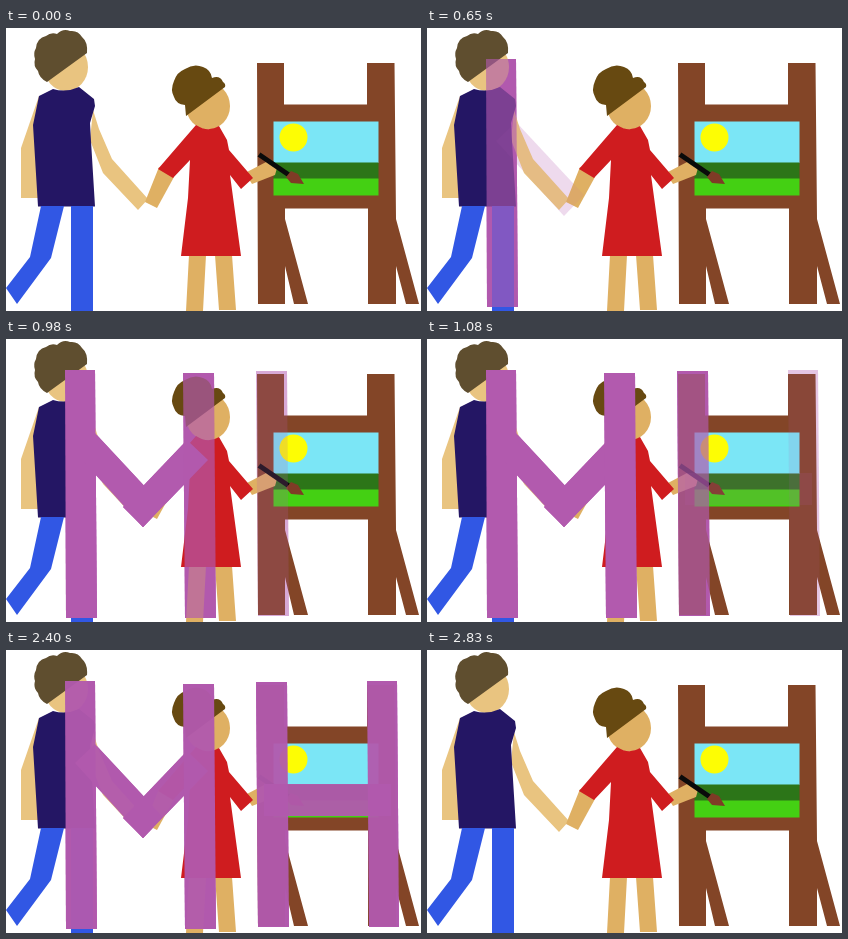
Write an HTML page that moves like this. It is 415 by 283 pixels and loops after 3 s.

```html
<!DOCTYPE html>
<html lang="en">
<head>
<meta charset="utf-8">
<title>Letters over a family scene</title>
<style>
html, body { margin: 0; height: 100%; overflow: hidden; background: #fff; }
svg { display: block; width: 100vw; height: 100vh; }
</style>
</head>
<body>
<svg viewBox="0 0 415 283">
  <g id="under" fill="#b25aae"></g>

  <g id="man">
    <g fill="#e9c480">
      <path d="M33 68L15 120V170H33Z"/>
      <path d="M87 82L93 101 106 131 142 171 132 182 97 145 84 112Z"/>
      <ellipse cx="60" cy="39" rx="22" ry="24"/>
    </g>
    <path fill="#5f4e2f" d="M41 54Q33 50 32 43Q27 38 29 31Q27 25 30 20Q31 10 40 8Q45 4 51 6Q57 0 64 3Q72 2 76 9Q82 14 81 25Z"/>
    <path fill="#241664" d="M33 68L47 61Q60 65 73 59L88 71 89 78 84 95 85 113 89 178.500H32L27 97Z"/>
    <path fill="#3157e4" d="M35 178H58L45 230 11 276 0 260 24 229ZM65 178H87V283H65Z"/>
  </g>

  <g id="easel">
    <path fill="#834527" d="M251 35H278V76.500H361V35H388.500L390 191 413 276H400L390 238V276H362V180.500H279V191L302 276H288L279 238V276H252Z"/>
    <path fill="#7be6f6" d="M267.500 93.500H372.500V135H267.500Z"/>
    <path fill="#2c7518" d="M267.500 134.500H372.500V151H267.500Z"/>
    <path fill="#44d013" d="M267.500 150.500H372.500V167.500H267.500Z"/>
    <circle fill="#fdfd04" cx="287.500" cy="109.500" r="14"/>
  </g>

  <g id="woman">
    <g fill="#dfb063">
      <path d="M153 139L168 149 151 180 139 174Z"/>
      <path d="M239 145L262 133 271 140 269 147 246 156Z"/>
      <path d="M183 227H200L197 283H180ZM209 227H226L230 282H213Z"/>
      <ellipse cx="202" cy="78" rx="22" ry="23.500"/>
    </g>
    <path fill="#674911" d="M180 88L179 77Q170 76 168 69Q164 62 168 53Q171 44 179 41Q188 35 197 39Q205 42 206 50Q214 47 217 54Q220 56 219 59Z"/>
    <path fill="#cf1c1f" d="M190 97Q202 105 213 98L221 112 223 122 247 150 235 161 224 147 235 228H175L182 170 184 132 167 150 152 141 177 112Z"/>
    <path stroke="#0a0a0a" stroke-width="5" d="M253 126.500L283 147"/>
    <path fill="#7f3b26" d="M285 143L292 146 298 156 285 155 280 149Z"/>
  </g>

  <g id="over" fill="#b25aae"></g>
</svg>
<script>
const LOOP = 3000, FADE_IN = 205, OUT_START = 2380, OUT_TIME = 450;

// Letter strokes: start time in ms and outline.
const strokes = [
  [522, "59,31 89,31 91,279 60,279"],
  [635, "89,94 157,167 137,188 69,113"],
  [737, "181,101 202,121 137,188 117,168"],
  [840, "177,34 208,34 210,279 179,279"],
  [940, "250,32 281,32 283,277 252,277"],
  [1055, "361,31 391,31 393,277 363,277"],
  [1055, "258,134 385,134 385,166 258,166"]
];

const clamp = x => Math.max(0, Math.min(1, x));

function addPolygon(groupId, points) {
  const polygon = document.createElementNS("http://www.w3.org/2000/svg", "polygon");
  polygon.setAttribute("points", points);
  return document.getElementById(groupId).appendChild(polygon);
}

const layers = strokes.map(([start, points]) => ({
  start,
  under: addPolygon("under", points),
  over: addPolygon("over", points)
}));

// On the bare background a stroke turns solid twice as fast as over the figures.
function draw(now) {
  const time = now % LOOP;
  const remaining = 1 - clamp((time - OUT_START) / OUT_TIME);
  for (const { start, under, over } of layers) {
    const alpha = clamp((time - start) / FADE_IN) * remaining;
    over.style.opacity = alpha;
    under.style.opacity = clamp(alpha * 2);
  }
}

const begin = performance.now();
function tick() {
  draw(performance.now() - begin);
  requestAnimationFrame(tick);
}
tick();
</script>
</body>
</html>
```
